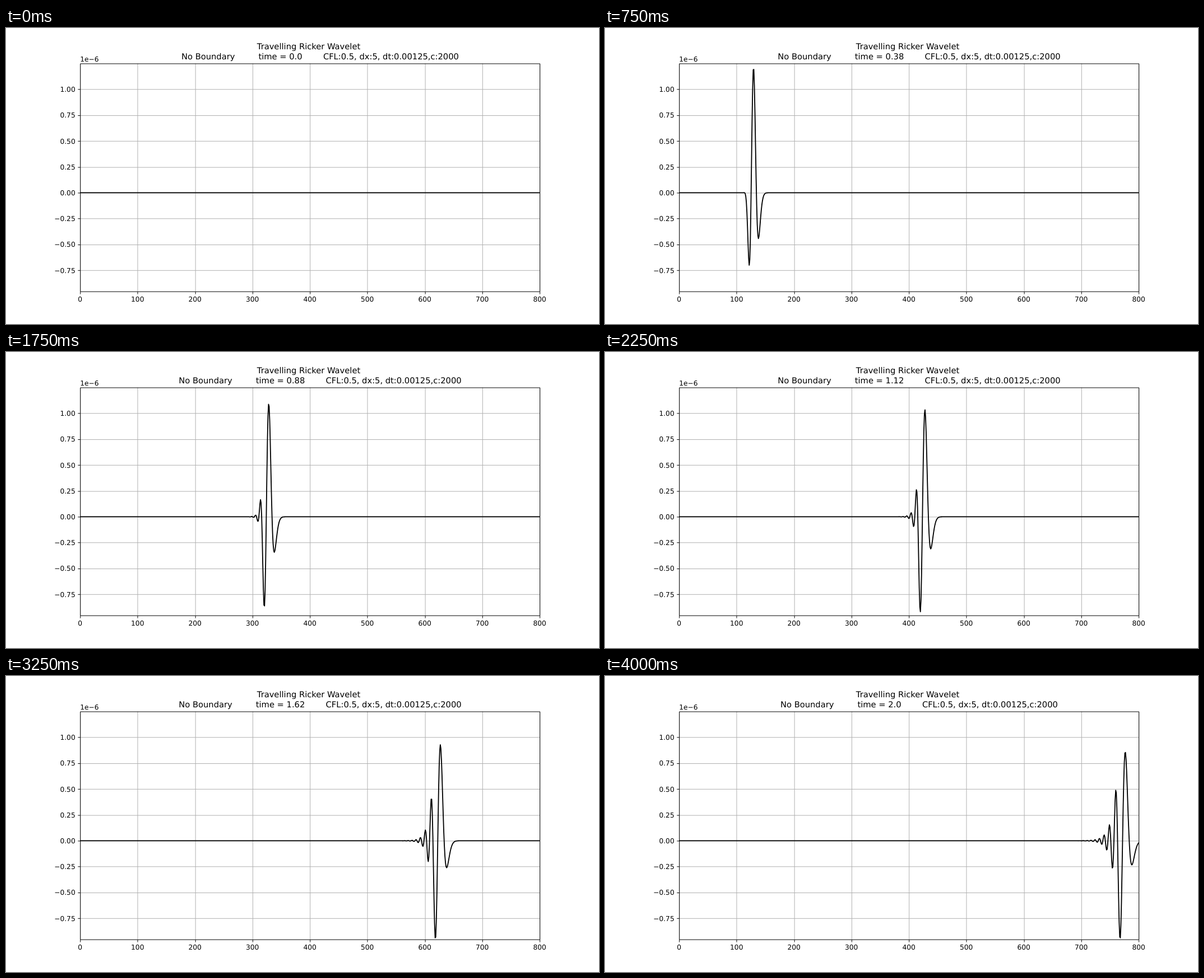
Animation of 1058x529 px, one loop 4.25 s. Source, as an HTML page:

```html
<!DOCTYPE html>
<html lang="en">
<head>
<meta charset="utf-8">
<title>Travelling Ricker Wavelet</title>
<style>
html, body { margin: 0; width: 100%; height: 100%; overflow: hidden; background: #fff; }
svg { display: block; width: 100%; height: 100%; }
text {
  font-family: "DejaVu Sans", sans-serif; font-size: 13.89px;
  white-space: pre; text-rendering: geometricPrecision;
}
.title { font-size: 16.67px; text-anchor: middle; }
.x { text-anchor: middle; }
.y { text-anchor: end; }
.grid { stroke: #b0b0b0; }
.axis { stroke: #000; }
path { fill: none; stroke-width: 1.11; }
#wave { stroke: #000; stroke-width: 2.08; stroke-linejoin: round; stroke-linecap: square; }
</style>
</head>
<body>
<svg viewBox="0 0 1200 600">
  <clipPath id="area"><rect x="150" y="72" width="930" height="462"/></clipPath>
  <text class="title" x="612.5" y="43.3">Travelling Ricker Wavelet</text>
  <text class="title" id="info" x="635.7" y="63.8"></text>
  <text x="150" y="67.8">1e−6</text>
  <path class="grid" id="grid"/>
  <path class="axis" id="ticks"/>
  <g id="labels"></g>
  <path id="wave" clip-path="url(#area)"/>
  <path class="axis" d="M150.5 72.5H1080.5V534.5H150.5Z"/>
</svg>
<script>
const $ = id => document.getElementById(id);
const LEFT = 150, RIGHT = 1080, TOP = 72, BOTTOM = 534;
const Y_MAX = 1.25, Y_MIN = -0.955;
const CELLS = 800, STEPS = 100, FRAMES = 17, FRAME_MS = 250;
const DT = 0.00125, CFL = 0.5, FREQ = 20, AMP = 1.25;

const px = x => LEFT + (RIGHT - LEFT) * x / CELLS;
const py = y => TOP + (BOTTOM - TOP) * (Y_MAX - y) / (Y_MAX - Y_MIN);
const snap = v => Math.round(v) + 0.5;

function label(cls, x, y, str) {
  const el = document.createElementNS("http://www.w3.org/2000/svg", "text");
  el.setAttribute("class", cls);
  el.setAttribute("x", x);
  el.setAttribute("y", y);
  el.textContent = str;
  $("labels").append(el);
}

function drawAxes() {
  let grid = "", ticks = "";
  for (let v = 0; v <= CELLS; v += 100) {
    const x = snap(px(v));
    grid += `M${x} ${TOP}V${BOTTOM}`;
    ticks += `M${x} 534.5v5`;
    label("x", px(v), 554.4, v);
  }
  for (let v = -0.75; v <= 1; v += 0.25) {
    const y = snap(py(v));
    grid += `M${LEFT} ${y}H${RIGHT}`;
    ticks += `M150.5 ${y}h-5`;
    label("y", 140.3, py(v) + 5.2, v.toFixed(2).replace("-", "−"));
  }
  $("grid").setAttribute("d", grid);
  $("ticks").setAttribute("d", ticks);
}

function ricker(t) {
  const a = (Math.PI * FREQ * (t - 1 / FREQ)) ** 2;
  return (1 - 2 * a) * Math.exp(-a);
}

// Second-order finite differences, fed next to a fixed left end.
function simulate() {
  const size = CELLS + 40, r2 = CFL * CFL, shots = [];
  let prev = new Float64Array(size), cur = new Float64Array(size), next = new Float64Array(size);
  for (let n = 0; n <= STEPS * (FRAMES - 1); n++) {
    for (let i = 1; i < size - 1; i++)
      next[i] = 2 * cur[i] - prev[i] + r2 * (cur[i + 1] - 2 * cur[i] + cur[i - 1]);
    next[1] += r2 * AMP * ricker(n * DT);
    [prev, cur, next] = [cur, next, prev];
    if (n % STEPS === 0) shots.push(wavePath(cur));
  }
  return shots;
}

function wavePath(u) {
  let d = "M";
  for (let i = 0; i <= CELLS; i++) d += px(i).toFixed(2) + " " + py(u[i]).toFixed(2) + " ";
  return d;
}

// Two decimals, halves rounded to even.
function timeText(frame) {
  const v = frame * STEPS * DT * 100;
  let r = Math.round(v);
  if (Math.abs(v % 1 - 0.5) < 1e-6) r = 2 * Math.round(v / 2);
  return r % 100 ? String(r / 100) : (r / 100).toFixed(1);
}

drawAxes();
const shots = simulate();
let shown = -1;

function render(ms) {
  const frame = Math.floor(ms / FRAME_MS) % FRAMES;
  if (frame !== shown) {
    shown = frame;
    $("wave").setAttribute("d", shots[frame]);
    $("info").textContent = "No Boundary" + " ".repeat(9) + "time = " + timeText(frame) +
      " ".repeat(8) + "CFL:0.5, dx:5, dt:0.00125,c:2000";
  }
}

const start = performance.now();
function tick() {
  render(performance.now() - start);
  requestAnimationFrame(tick);
}
tick();
</script>
</body>
</html>
```
